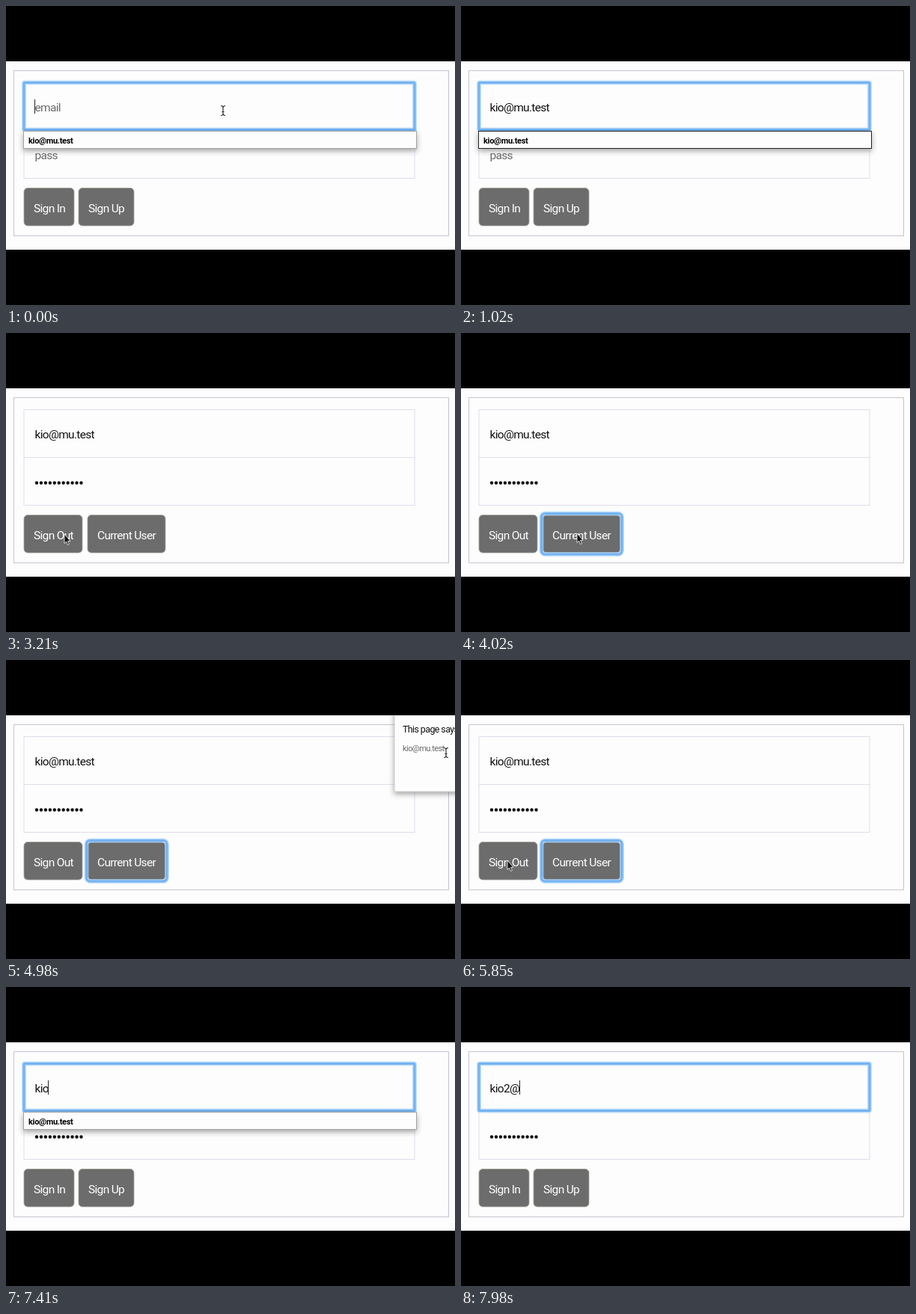
An HTML page for the animation above (8 s loop, 600 by 400 pixels).

```html
<!DOCTYPE html>
<html lang="en">
<head>
<meta charset="utf-8">
<title>Sign-in form</title>
<style>
  html, body { margin: 0; width: 100%; height: 100%; overflow: hidden; background: #000; }
  svg { display: block; width: 600px; height: 400px; }
  text { font: 15.5px Roboto, Arial, sans-serif; letter-spacing: -.68px; fill: #111; white-space: pre; }
  .hint { fill: #6a6a6a; }
  .field { fill: none; stroke: #dedeee; }
  .button rect { fill: #6c6c6c; stroke: #a3a39a; stroke-width: .8; }
  .button text { fill: #fff; }
  .glow { fill: none; stroke: #a9d3fb; stroke-width: 6; opacity: .7; }
  .ring { fill: none; stroke: #74b3f2; stroke-width: 3.2; }
  .small { font-size: 11px; letter-spacing: -.3px; }
  .title { font-size: 12.5px; letter-spacing: -.62px; }
  .message { font-size: 11px; letter-spacing: -.55px; }
  .bold { font-weight: 700; fill: #000; }
  .dots { fill: none; stroke: #111; stroke-width: 4.5; stroke-linecap: round; stroke-dasharray: 0 5.95; }
</style>
</head>
<body>
<svg viewBox="0 0 600 400">
  <defs>
    <filter id="shadow" x="-10%" y="-40%" width="120%" height="220%">
      <feDropShadow dx="0" dy="3" stdDeviation="3.5" flood-color="#333" flood-opacity=".45"/>
    </filter>
  </defs>
  <rect width="600" height="400"/>
  <rect y="74" width="600" height="252" fill="#fdfdfd"/>
  <rect x="10.5" y="86.5" width="581" height="221" fill="none" stroke="#c6c5d0"/>
  <rect class="field" x="24" y="102.5" width="522" height="64"/>
  <rect class="field" x="24" y="166.5" width="522" height="64"/>

  <g id="buttons"></g>
  <g id="focus">
    <rect class="glow"/>
    <rect class="ring"/>
  </g>

  <rect id="selection" x="38" y="124" height="21" fill="#b8f6a0"/>
  <text id="email" x="38.5" y="140.5"></text>
  <text id="passHint" class="hint" x="38.5" y="205">pass</text>
  <path id="dots" class="dots"/>
  <path id="caret" stroke="#222"/>

  <g id="list">
    <rect x="23.5" y="167.5" width="525" height="23" fill="#fdfdfd" filter="url(#shadow)"/>
    <text class="small bold" x="30" y="183.5"></text>
  </g>

  <g id="alert">
    <rect x="519" y="60" width="120" height="116" fill="#fdfdfd" stroke="#c8c8c8" filter="url(#shadow)"/>
    <text class="title" x="530" y="97">This page says</text>
    <text class="message hint" x="530" y="122"></text>
    <rect width="600" height="74"/>
  </g>

  <g id="pointer">
    <path id="arrow" d="M0 0V12.5L2.6 10L4.5 14.5L6.4 13.6L4.6 9.3H8Z" fill="#111" stroke="#fff" stroke-width=".8"/>
    <path id="beam" d="M-3-6.5Q0-6.5 0-4Q0-6.5 3-6.5M0-4V4M-3 6.5Q0 6.5 0 4Q0 6.5 3 6.5M-1.5 1.5H1.5" fill="none" stroke="#222" stroke-width="1.1"/>
  </g>
</svg>
<script>
const LOOP = 8000;
const ADDRESS = "kio@mu.test";
const $ = id => document.getElementById(id);
const show = (node, on) => node.setAttribute("visibility", on ? "inherit" : "hidden");
const set = (node, attrs) => {
  for (const key in attrs) node.setAttribute(key, attrs[key]);
};

const BUTTONS = {
  signIn: { x: 24, width: 67, label: "Sign In" },
  signUp: { x: 97, width: 74, label: "Sign Up" },
  signOut: { x: 24, width: 78, label: "Sign Out" },
  user: { x: 109, width: 104, label: "Current User" }
};

const FOCUS_BOXES = {
  email: { x: 24, y: 102.5, width: 522, height: 63, rx: 1 },
  pass: { x: 24, y: 166.5, width: 522, height: 63, rx: 1 }
};

// Each step overrides part of the state from its time on.
const STEPS = [
  [0, { email: "", focus: "email", caret: true, list: "open", signedIn: false, alert: false, selected: false }],
  [510, { email: ADDRESS, list: "active", caret: false }],
  [1110, { list: "" }],
  [1170, { focus: "pass" }],
  [1980, { focus: "signIn" }],
  [2580, { signedIn: true, focus: "" }],
  [3930, { focus: "user" }],
  [4200, { alert: true }],
  [5310, { alert: false }],
  [5970, { focus: "signOut" }],
  [6150, { signedIn: false, focus: "" }],
  [6600, { focus: "email" }],
  [6660, { selected: true }],
  [7110, { selected: false, caret: true, email: ADDRESS.slice(0, 1), list: "open" }],
  [7230, { email: ADDRESS.slice(0, 2) }],
  [7350, { email: ADDRESS.slice(0, 3) }],
  [7590, { email: ADDRESS.slice(0, 3) + "2", list: "" }],
  [7860, { email: ADDRESS.slice(0, 3) + "2@" }]
];

// Pointer stops: time, x, y.
const STOPS = [
  [0, 290, 140], [1680, 290, 140], [1950, 69, 260], [2610, 69, 260],
  [3000, 78, 269], [3330, 78, 269], [3780, 155, 268], [4260, 155, 268],
  [4920, 588, 124], [5040, 588, 124], [5220, 625, 158], [5370, 625, 158],
  [5820, 62, 268], [6180, 62, 268], [6570, 156, 140], [LOOP, 156, 140]
];

function stateAt(t) {
  const state = {};
  for (const [time, change] of STEPS) if (time <= t) Object.assign(state, change);
  state.dots = Math.max(0, Math.min(11, Math.floor((t - 1230) / 48) + 1));
  return state;
}

function pointerAt(t) {
  const i = STOPS.findIndex(stop => stop[0] > t);
  const [t0, x0, y0] = STOPS[i - 1], [t1, x1, y1] = STOPS[i];
  const p = (t - t0) / (t1 - t0), k = p * p * (3 - 2 * p);
  return [x0 + (x1 - x0) * k, y0 + (y1 - y0) * k];
}

function makeButton({ x, width, label }) {
  const ns = "http://www.w3.org/2000/svg";
  const group = document.createElementNS(ns, "g");
  const box = document.createElementNS(ns, "rect");
  const text = document.createElementNS(ns, "text");
  group.setAttribute("class", "button");
  set(box, { x, y: 243.5, width, height: 50.5, rx: 5 });
  set(text, { x: x + 13, y: 275.5 });
  text.textContent = label;
  group.append(box, text);
  $("buttons").append(group);
  return group;
}

const buttons = {};
for (const name in BUTTONS) {
  const { x, width } = BUTTONS[name];
  buttons[name] = makeButton(BUTTONS[name]);
  FOCUS_BOXES[name] = { x: x - 1.5, y: 241.5, width: width + 3.5, height: 54.5, rx: 5 };
}
document.querySelector("#list text").textContent = ADDRESS;
document.querySelector("#alert .message").textContent = ADDRESS;

function draw(t) {
  const s = stateAt(t);
  for (const name in buttons) {
    show(buttons[name], s.signedIn === (name === "signOut" || name === "user"));
  }

  show($("focus"), s.focus);
  if (s.focus) for (const rect of $("focus").children) set(rect, FOCUS_BOXES[s.focus]);

  const email = $("email");
  email.textContent = s.email || "email";
  email.setAttribute("class", s.email ? "" : "hint");
  const width = s.email ? email.getComputedTextLength() : 0;
  show($("selection"), s.selected);
  $("selection").setAttribute("width", width + 1);

  show($("passHint"), !s.dots);
  show($("dots"), s.dots);
  $("dots").setAttribute("d", `M41 200.5h${Math.max(0, s.dots - 1) * 5.95 + .01}`);

  show($("caret"), s.caret);
  $("caret").setAttribute("d", `M${38.5 + Math.round(width)} 125V144`);

  show($("list"), s.list);
  $("list").firstElementChild.setAttribute("stroke", s.list === "active" ? "#222" : "#a4a4a4");
  show($("alert"), s.alert);

  const [x, y] = pointerAt(t);
  const overField = x > 24 && x < 546 && y > 102 && y < 230;
  const overMessage = s.alert && x > 528 && y > 84 && y < 130;
  const typing = (t > 450 && t < 1680) || t > 7110;
  show($("pointer"), !typing);
  $("pointer").setAttribute("transform", `translate(${x} ${y})`);
  show($("beam"), !typing && (overField || overMessage));
  show($("arrow"), !typing && !overField && !overMessage);
}

const start = performance.now();
function tick() {
  draw((performance.now() - start) % LOOP);
  requestAnimationFrame(tick);
}
tick();
</script>
</body>
</html>
```
